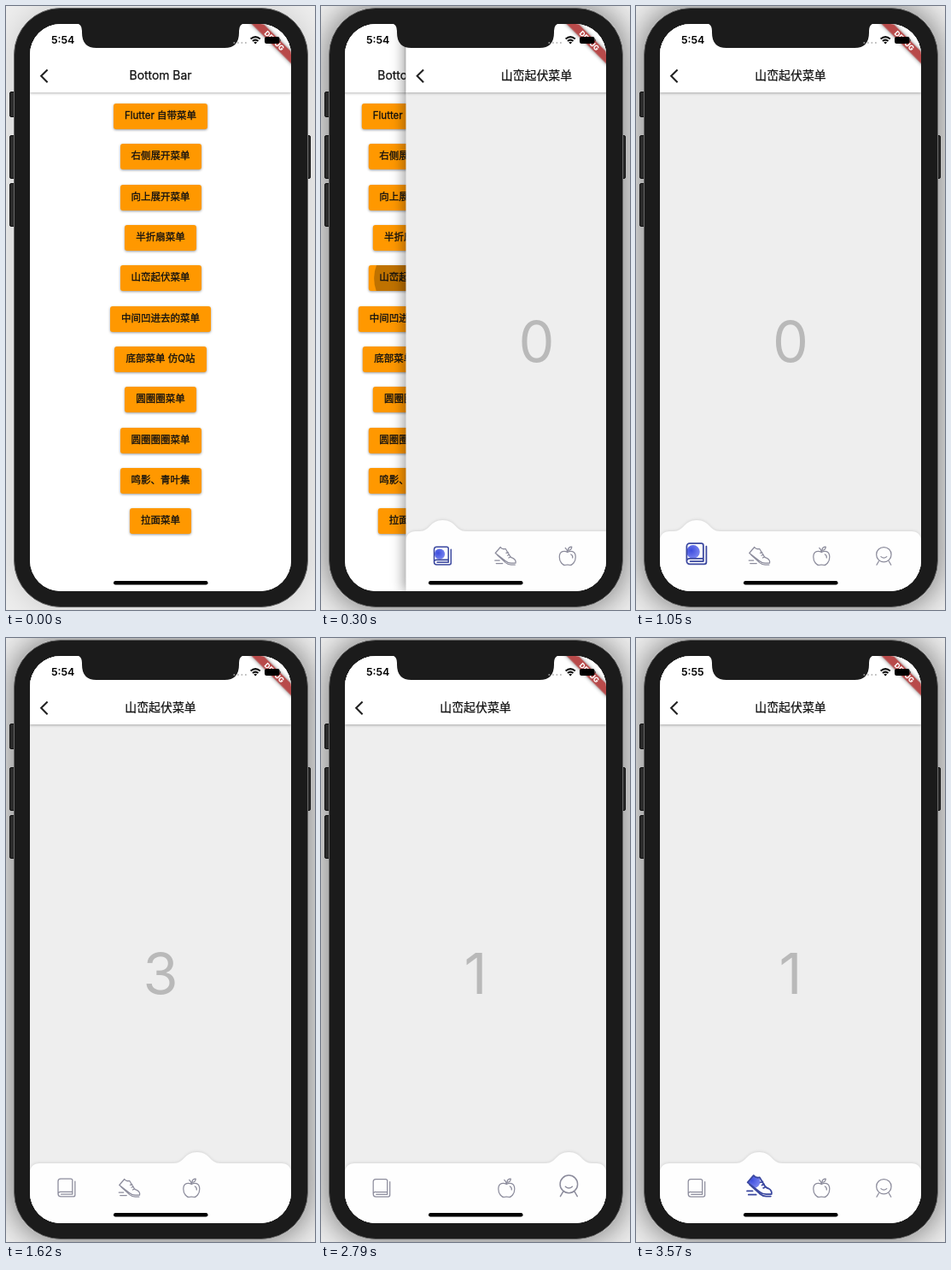
Recreate the animation shown at these times as an HTML page. Size 362 by 706 pixels, loop 3630 ms.

```html
<!DOCTYPE html>
<html lang="zh">
<head>
<meta charset="utf-8">
<title>Bottom Bar</title>
<style>
  html, body { margin: 0; width: 100%; height: 100%; overflow: hidden; background: #eee; }
  #stage { position: relative; width: 362px; height: 706px; overflow: hidden;
    font-family: Inter, "Noto Sans CJK SC", "Noto Sans CJK", sans-serif; color: #111; }
  #stage div, #stage svg { position: absolute; box-sizing: border-box; }
  #shade { left: 9px; top: 2px; width: 345px; height: 701px; border-radius: 55px;
    box-shadow: 0 0 34px 4px rgba(0,0,0,.45); }
  .key { width: 7px; background: #2b2b2b; border: 1px solid #111; border-radius: 2px; }
  #body { left: 9px; top: 2px; width: 345px; height: 701px; border-radius: 55px;
    background: #1b1b1b; border: 1px solid #666; }
  #screen { left: 28px; top: 21px; width: 306px; height: 663px; border-radius: 36px;
    overflow: hidden; background: #fff; }
  .page { left: 0; top: 0; width: 306px; height: 663px; background: #fff; }
  #detail { background: #eee; box-shadow: -2px 0 14px rgba(0,0,0,.4); }
  .head { left: 0; top: 0; width: 306px; height: 80px; background: #fff;
    box-shadow: 0 1px 3px rgba(0,0,0,.3); }
  .head span { position: absolute; top: 50px; width: 100%; line-height: 21px;
    text-align: center; font-size: 13.9px; -webkit-text-stroke: .25px #111; }
  .head svg { left: 11.4px; top: 52px; }
  #list { left: 0; top: 93px; width: 306px; display: flex; flex-direction: column;
    align-items: center; gap: 17.35px; }
  #stage .btn { position: relative; height: 30px; line-height: 29px; padding: 0 13px; overflow: hidden;
    border-radius: 3px; background: #ff9800; box-shadow: 0 1px 3px rgba(0,0,0,.4);
    font-size: 11.5px; -webkit-text-stroke: .3px #111; white-space: nowrap; }
  .btn span { position: relative; }
  #ripple { left: 50%; top: 50%; border-radius: 50%; background: rgba(0,0,0,.25);
    transform: translate(-50%, -50%); }
  #digit { left: 0; top: 328px; width: 306px; line-height: 86px; text-align: center;
    font-size: 66.5px; color: #b9b9b9; }
  .full { left: 0; top: 0; }
</style>
</head>
<body>
<div id="stage">
  <div id="shade"></div>
  <div class="key" style="left:4px;top:100px;height:30px"></div>
  <div class="key" style="left:4px;top:151px;height:51px"></div>
  <div class="key" style="left:4px;top:207px;height:51px"></div>
  <div class="key" style="left:350px;top:151px;height:51px"></div>
  <div id="body"></div>
  <div id="screen">
    <div class="page" id="home"><div id="list"></div></div>
    <div class="page" id="detail">
      <div id="digit">0</div>
      <svg class="full" width="306" height="663" viewBox="28 21 306 663">
        <defs>
          <radialGradient id="ink" cx=".35" cy=".4" r=".75">
            <stop offset="0" stop-color="#3d4ddd"/><stop offset="1" stop-color="#7f8bf2"/>
          </radialGradient>
        </defs>
        <path id="bar" fill="#fefefe" style="filter:drop-shadow(0 -1px 1.5px rgba(0,0,0,.09))"/>
        <g id="tabs"></g>
      </svg>
    </div>
    <svg class="full" width="306" height="663">
      <g transform="translate(306 0) rotate(45)">
        <rect x="-50" y="22.8" width="100" height="9.8" fill="#b84a4a" style="filter:drop-shadow(0 0 2px rgba(0,0,0,.5))"/>
        <text y="30.8" text-anchor="middle" font-size="8.3" font-weight="800" fill="#fff">DEBUG</text>
      </g>
    </svg>
  </div>
  <svg class="full" width="362" height="706">
    <path d="M82 20Q89 21 89 29V31Q89 49 106 49H256Q273 49 273 31V29Q273 21 280 20Z" fill="#1b1b1b"/>
    <text id="clock" x="53" y="44.3" font-size="12.4" font-weight="600">5:54</text>
    <path d="M266.5 43H282" stroke="#aaa" stroke-width="1.7" stroke-dasharray="1.7 2.8"/>
    <g fill="none" stroke="#111" stroke-width="2">
      <path d="M286.6 38.6Q292.2 33.6 297.8 38.6M288.9 41.1Q292.2 38.1 295.5 41.1"/>
    </g>
    <path d="M290.3 42.4Q292.2 41 294.1 42.4L292.2 44.6Z"/>
    <rect x="303" y="36" width="17.5" height="8" rx="2.2"/>
    <path d="M321.3 38.5q1.5 1.5 0 3z"/>
    <rect x="126" y="672" width="110.5" height="4.5" rx="2.2" fill="#000"/>
  </svg>
</div>
<script>
const LOOP = 3630;
const $ = id => document.getElementById(id);
const clamp = v => Math.max(0, Math.min(1, v));
const part = (t, from, span) => clamp((t - from) / span);
const easeOut = (p, n = 3) => 1 - (1 - p) ** n;
const smooth = p => p * p * (3 - 2 * p);

const head = title => `<div class="head"><svg width="12" height="18" fill="none" stroke="#222"
  stroke-width="2.1"><path d="M9.6 1.5L2.2 8.8L9.6 16.2"/></svg><span>${title}</span></div>`;
$('home').insertAdjacentHTML('beforeend', head('Bottom Bar'));
$('detail').insertAdjacentHTML('beforeend', head('山峦起伏菜单'));

const labels = ['Flutter 自带菜单', '右侧展开菜单', '向上展开菜单', '半折扇菜单', '山峦起伏菜单',
  '中间凹进去的菜单', '底部菜单 仿Q站', '圆圈圈菜单', '圆圈圈圈菜单', '鸣影、青叶集', '拉面菜单'];
$('list').innerHTML = labels.map((s, i) =>
  `<div class="btn">${i === 4 ? '<div id="ripple"></div>' : ''}<span>${s}</span></div>`).join('');

// Tab icons: outline, detail strokes, and the ink spot [x, y, r]
const icons = [
  { shape: 'M-10 7V-7.5A3 3 0 0 1 -7 -10.5H4.5A2 2 0 0 1 6.5 -8.5V4.5H-7.2A2.6 2.6 0 0 0 -10 7Z',
    lines: 'M-10 7A3 3 0 0 0 -7 10H7.5A2 2 0 0 0 9.5 8V-7.5M-6.5 7.3H6.5V4.5', spot: [-3.6, -2.2, 6.6] },
  { shape: 'M-11.5 -3.5L-5.5 -10.5Q-3.5 -7.5 .5 -8.5L5 -1Q6 1.5 9.5 2.6Q13 4.5 12.3 8.2H7Q3.5 8.2 .5 5.8Z',
    lines: 'M-9.5 -1.5L.5 7.6Q3.5 10.2 7 10.2H11.5M1.2 -3.6L3.6 -4.4M2.8 -.8L5 -1.8M4.2 2L6.6 .8M-12 5H-6.5M-10.5 8.6H-3',
    spot: [-5.5, -4.5, 6.6] },
  { shape: 'M0 -4.5C3 -6.5 9.5 -6.5 9.5 1C9.5 7 5.5 10.5 3 10.5Q1.5 10 0 10Q-1.5 10 -3 10.5C-5.5 10.5 -9.5 7 -9.5 1C-9.5 -6.5 -3 -6.5 0 -4.5Z',
    lines: 'M0 -4.5Q0 -7.5 -2.5 -9.5M.5 -6.5Q.8 -11 5 -11Q5 -7 .5 -6.5M4 -2Q6.3 -1 6 2', spot: [-3, 1, 6.6] },
  { shape: 'M-8.7 -1.8A8.7 8.7 0 1 1 8.7 -1.8A8.7 8.7 0 1 1 -8.7 -1.8Z',
    lines: 'M-3.4 .6Q0 3.6 3.4 .6M-5.8 5.8L-8.4 10.3M5.8 5.8L8.4 10.3', spot: [2.3, 0, 6] }
];
const dots = [[2.1, -19, 2.7], [16.4, 3, 2.4], [-19, -2.5, 1.1]];
const tabX = i => 71.2 + 73.05 * i;

const outline = (o, color, w) => `<path d="${o.shape}${o.lines}" fill="none" stroke="${color}"
  stroke-width="${w}" stroke-linecap="round" stroke-linejoin="round"/>`;
$('tabs').innerHTML = icons.map((o, i) => `
  <clipPath id="clip${i}"><path d="${o.shape}"/></clipPath>
  <g id="idle${i}">${outline(o, '#8c8c9c', 1.25)}</g>
  <g id="live${i}">
    <g id="face${i}">
      <g clip-path="url(#clip${i})"><circle id="spot${i}" cx="${o.spot[0]}" cy="${o.spot[1]}" fill="url(#ink)"/></g>
      ${outline(o, '#3a479f', 1.5)}
    </g>
    ${dots.map((d, k) => `<circle id="dot${i}${k}" fill="#2935c2"/>`).join('')}
  </g>`).join('');

const taps = [
  { tab: 0, at: 0, pop: 150 },
  { tab: 3, at: 1380, pop: 1700 },
  { tab: 1, at: 2790, pop: 3090 }
];
const LIFT = 2.5, GROW = .18;

function drawBar(x) {
  $('bar').setAttribute('d', `M28 690V626Q28 614 40 614H${x - 27}
    C${x - 15} 614 ${x - 15} 601 ${x} 601S${x + 15} 614 ${x + 27} 614H322Q334 614 334 626V690Z`);
}

function drawLive(i, p) {
  const rise = smooth(part(p, .22, .36));
  const lift = LIFT * rise + .8 * Math.sin(Math.PI * part(p, .35, .5));
  const scale = .2 + .8 * easeOut(part(p, 0, .22)) + GROW * rise;
  $('live' + i).setAttribute('transform', `translate(${tabX(i)} ${643 - lift})`);
  $('face' + i).setAttribute('transform', `scale(${scale})`);
  $('spot' + i).setAttribute('r', icons[i].spot[2] * easeOut(part(p, 0, .5)));
  const reach = .5 + .5 * easeOut(part(p, .33, .27));
  const size = part(p, .33, .15) * (1 - smooth(part(p, .65, .22)));
  dots.forEach(([x, y, r], k) => {
    const dot = $(`dot${i}${k}`);
    dot.setAttribute('cx', x * reach);
    dot.setAttribute('cy', y * reach);
    dot.setAttribute('r', r * size);
  });
}

function render(t) {
  const push = easeOut(part(t, 165, 400), 3.5);
  $('home').style.transform = `translateX(${-102 * push}px)`;
  $('detail').style.transform = `translateX(${306 * (1 - push)}px)`;
  $('detail').style.visibility = push ? 'visible' : 'hidden';
  $('shade').style.opacity = t < 120 ? .25 : 1;
  const ripple = t < 120 ? 0 : 24 + 57 * (t - 120) / 180;
  $('ripple').style.width = $('ripple').style.height = Math.min(ripple, 130) + 'px';
  $('clock').textContent = t < 3330 ? '5:54' : '5:55';

  const n = taps.filter(s => s.at <= t).length - 1;
  const now = taps[n], last = taps[n - 1] || now;
  const move = smooth(part(t, now.at, 380));
  $('digit').textContent = now.tab;
  drawBar(tabX(last.tab) + (tabX(now.tab) - tabX(last.tab)) * move);

  icons.forEach((o, i) => {
    const on = i === now.tab;
    const rest = i === last.tab ? 1 - smooth(part(t, now.at, 300)) : 0;
    $('idle' + i).setAttribute('display', on ? 'none' : 'inline');
    $('idle' + i).setAttribute('transform',
      `translate(${tabX(i)} ${643 - LIFT * rest}) scale(${1 + GROW * rest})`);
    $('live' + i).setAttribute('display', on && t >= now.pop ? 'inline' : 'none');
    if (on) drawLive(i, part(t, now.pop, 540));
  });
}

const start = performance.now();
function tick() {
  render((performance.now() - start) % LOOP);
  requestAnimationFrame(tick);
}
tick();
</script>
</body>
</html>
```
